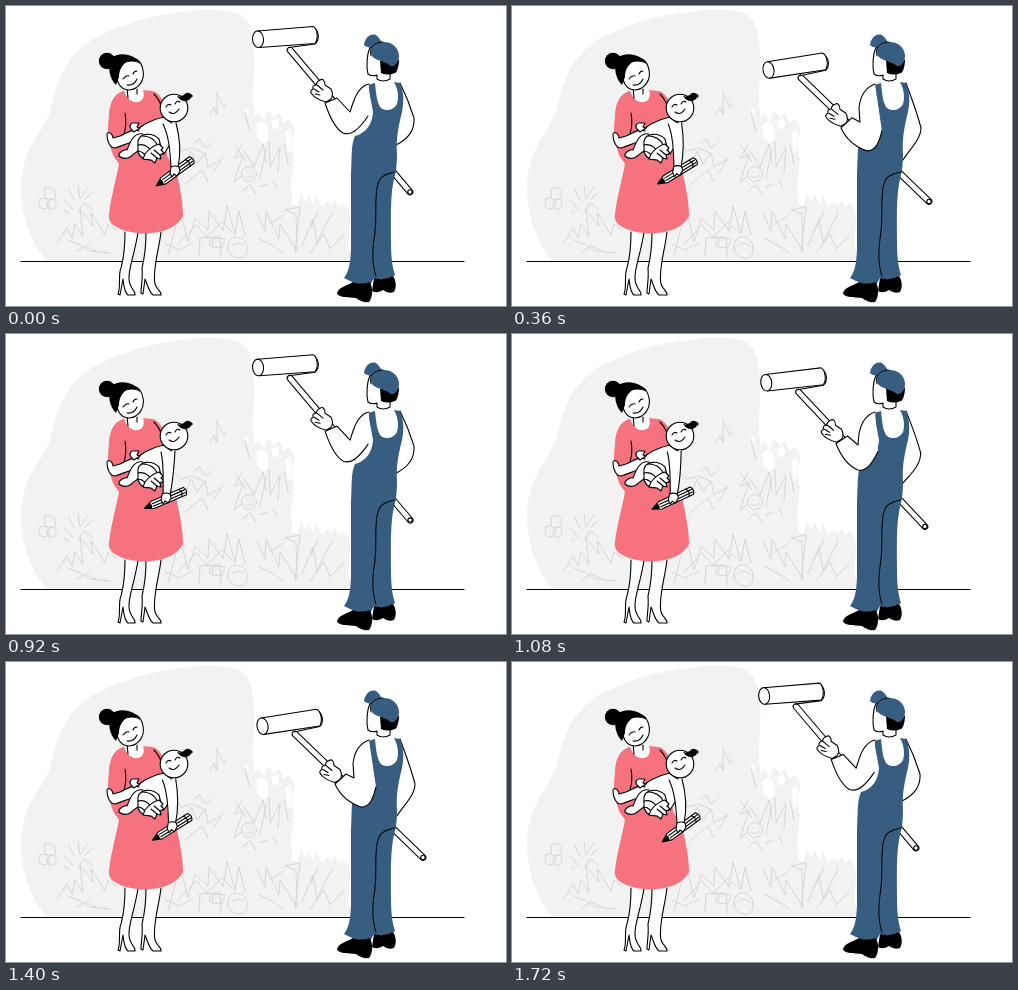
Write an HTML page that moves like this. It is 500 px wide and 300 px high and loops after 1.76 s.

```html
<!DOCTYPE html>
<html lang="en">
<head>
<meta charset="utf-8">
<title>Painting over the wall</title>
<style>
  html, body { margin: 0; height: 100%; overflow: hidden; background: #fff; }
  svg { display: block; width: 100%; height: 100%; }
  .line { fill: none; }
  .ink { fill: #000; stroke: none; }
  .pink { fill: #f7727f; stroke: none; }
  .blue { fill: #375d80; stroke: none; }
  .bare { fill: #fff; stroke: none; }
</style>
</head>
<body>
<svg viewBox="0 0 500 300" fill="#fff" stroke="#000" stroke-width="1.1" stroke-linecap="round" stroke-linejoin="round">
  <!-- wall -->
  <path fill="#f2f2f2" stroke="none" d="M246 30C245 18 239 9 228 6C214 3 195 3 178 6C145 9 115 18 87 33C66 46 54 66 48 90C44 108 41 115 33 127C19 147 14 166 15 188C17 214 25 236 40 254H346L342 236C343 225 346 212 342 203L337 197 333 202 330 194 326 199 321 196 316 201 311 190 307 198 303 189 299 197 295 188 291 200 286 198 285 178 288 155 285 136 289 122 283 113 277 117 273 106 268 112 262 104 258 115 253 107 249 111C246 99 247 82 248 68C249 50 248 40 246 30Z"/>
  <path class="bare" d="M251 118q5-5 10 0l2 15q-5 6-9 2q-5-4-3-17ZM280 126l5-3v22q-4 4-4-4ZM238 104l5-2-1 7ZM265 115l7-3 1 9-6 3Z"/>
  <g class="line" stroke="#d3d3d3" stroke-width=".9">
    <path d="M39 183q7-4 10 3t-5 8q-7 0-5-11ZM34 193q7-3 9 3t-5 7q-7-1-4-10ZM44 193q7-1 6 6t-8 3q-3-5 2-9"/>
    <path d="M62 182l6 12M59 195l8 9M72 180l2 13 8-12M72 206l6-9 9 7M79 193l7-6M58 204l5 3"/>
    <path d="M52 236l9-14 5 10 3-14 8 13-3-28 13 17-2-14 14 23 3-11 8 6M62 234l12 5 9 6 21 2M70 246l9-6 11 5"/>
    <path d="M204 109l4-8 3 7 0-21 7 14 2-3M188 137l6-4 5 9 7-5M166 136l9 9 11-3 14 6M178 163l7-18 6 13 8-11 3 14 14-8-9 14M178 179l18-15 6 12"/>
    <path d="M236 139l-8 13 9-3-9 27 8-6M238 145l10 16 9-23 3 19M229 139l11 17M260 143l-6 29M263 136l1 25 10-20-2 26M278 138l4 20M267 174l4 9M253 181l8-3M236 185l8-6 6 9M239 107l5 19"/>
    <circle cx="243" cy="168" r="7.5"/><path d="M240 166h1M245 166h1M239 170q4 4 8-1"/>
    <path d="M162 249l12-46 8 33 7-24 13 12 1-19 14 20 4-25 8 28 4-23 6 24M172 238l18-19 11 12 15-15 10 10M160 238l13 6 14-7M194 232l20-1 1 21M194 232l-1 18M204 232v8M219 233l-12-1-1 9 9 1Z"/>
    <path d="M222 244q-1-14 9-13t10 12-9 9-10-8ZM226 240q6-6 12 0M251 208l8 17 1-20 13 28 1-15 17 27-1-37-11-4 15-3-5 45M252 232l17 9 8 6M296 240l11-27 4 24 15-30M304 247l14-19 6 15 14-15M312 205l-7 16M263 218l14-9"/>
  </g>
  <path class="line" d="M15 255.5H458"/>

  <!-- woman -->
  <path d="M119 226C119 241 118 251 115 262C112 268 115 281 112 288L114 289 117 273C118 280 118 286 122 289H129C130 286 126 284 124 278C120 268 129 248 132 226"/>
  <path d="M140 226C140 242 139 250 136 262C137 273 135 280 135 287L137 288 139 273C142 280 143 286 147 289H155C156 286 151 284 149 278C146 265 153 244 155 226"/>
  <path class="pink" d="M117 85C108 88 103 97 103 111C101 124 102 134 106 146C108 153 112 155 113 158C111 170 105 190 103 208C102 212 104 216 107 219C118 226 130 228 145 227C160 226 172 220 177 210C177 194 173 178 170 163L161 150 158 104C157 94 154 87 147 85L136 84 119 84Z"/>
  <path class="bare" d="M118 84C120 92 125 97 132 96C137 95 139 90 137 84Z"/>
  <path d="M121 81L122 91Q127 94 132 90L131 80Z" stroke="none"/>
  <path class="line" d="M121 81L122 92M131 83V88"/>
  <circle cx="101" cy="55" r="8.2" class="ink"/>
  <path d="M110 61C109 75 114 84 123 84C133 83 139 74 137 64C136 58 134 55 130 53L115 53Z"/>
  <path class="ink" d="M105 52C114 45 129 48 135 58C130 55 125 55 121 56C115 59 113 66 113 71L110 79C104 73 101 62 105 52Z"/>
  <path class="line" d="M117 73q3-4 6-3M127 68q1-3 4-3M121 79q7 1 10-6"/>
  <path class="line" d="M119 107Q121 118 118 128M148 88Q155 95 157 106"/>

  <!-- baby -->
  <path d="M158 111C149 113 142 116 136 120C130 124 128 131 131 140L140 149 158 148 166 135 168 119Z"/>
  <path d="M133 125C126 122 120 128 114 130L107 132C106 126 101 125 101 129C101 135 104 142 109 142C116 140 121 137 127 136"/>
  <path d="M137 128C128 126 124 136 121 144C118 143 112 147 113 150C116 153 121 153 124 151C130 146 134 143 138 142"/>
  <path d="M132 135C134 127 146 126 153 133L156 145C150 156 136 157 132 146Z"/>
  <path class="line" d="M136 130C146 130 151 136 153 144M132 139C140 137 146 143 147 152M132 145Q139 146 141 153"/>
  <path d="M139 148C143 143 149 139 153 138L157 142 155 144 158 147 154 149 155 153 151 152 149 157 145 154 137 153Z"/>
  <path class="line" d="M148 144l6 5M145 147l6 5"/>
  <path d="M125 123C122 119 126 116 129 117L133 117 131 121 134 122 128 126Z"/>
  <g id="pencil">
    <path d="M-24 1L-15-3H20Q23 1 20 5H-15Z"/>
    <path class="line" d="M-15-.3H20M-15 2.500H20M15-3Q18 1 15 5"/>
    <path class="ink" d="M-24 1L-17-2Q-15 1-17 4Z"/>
  </g>
  <path id="babyArm"/>
  <path id="babyHand" d="M-4-4Q0-6 4-4L5 0 2 5-1 3-3 6-5 2Z"/>
  <circle cx="168" cy="102" r="13.8"/>
  <path class="ink" d="M171 90C174 91 177 90 180 87Q184 86 187 90C184 93 182 95 179 95Q174 95 171 90Z"/>
  <path class="line" d="M160 101q2-4 5-2M169 98q2-4 5-2M163 106q6 4 10-3"/>

  <!-- painter: pole and roller -->
  <path id="poleEdge" stroke-width="6.8"/>
  <path id="poleFill" stroke="#fff" stroke-width="4.7"/>
  <circle id="poleEnd" r="2.2"/>
  <g id="roller">
    <path d="M308 22C313 25 314 34 309 38L283 41.500"/>
    <path d="M251.500 25L307 20.500C311 22 313 32 309 37.500L253 41.500Z"/>
    <ellipse cx="252" cy="33.200" rx="5.500" ry="8.300" transform="rotate(-5 252 33)"/>
  </g>

  <!-- painter: body -->
  <path id="backArm"/>
  <path class="bare" d="M363 77L371 72 385 72 394 78 396 95 390 135 350 138 348 105Z"/>
  <path d="M364 41C361 48 360 60 362 68Q366 71 371 69V73Q377 77 384 73V60L380 45Z"/>
  <path class="ink" d="M374 54L393 54C393 60 391 66 389 67Q381 70 375 67Z"/>
  <path class="blue" d="M358 39C359 32 364 27 370 29C373 31 374 34 376 36C385 35 393 41 393 50C393 56 389 61 385 60C378 55 372 55 368 52C364 49 364 45 365 41Q361 42 358 39Z"/>
  <path class="line" d="M365 50C362 42 368 36 377 36" stroke-width=".9"/>
  <path class="blue" d="M362 79L369 77C370 87 371 98 375 102C380 106 388 104 391 98C393 91 392 83 388 76L394 77C398 86 398 96 396 106C392 122 390 134 391 148C391 158 390 166 388 173C384 190 385 215 385 235C385 250 386 260 389 269Q379 276 368 272L364 279Q350 279 338 272C343 266 345 255 345 240L345 167C346 149 345 139 349 130C360 127 366 119 367 106Z"/>
  <path class="line" d="M389 166Q378 168 374 173C367 186 372 210 368 233Q365 255 370 270" stroke-dasharray="2 1"/>
  <path class="ink" d="M347 276Q355 279 364 276C367 282 367 291 363 296Q356 297 350 292C342 291 335 292 331 288C331 282 340 280 347 276ZM368 272Q378 275 387 270C391 276 390 283 388 286Q382 288 377 284Q371 288 366 285Z"/>
  <path id="frontArm"/>
  <g id="hand">
    <path d="M314 74C317 72 319 75 319 79L325 83C327 87 327 90 325 93L320 96C313 94 308 91 306 88Q303 85 307 83Q306 79 310 79Q311 75 314 74Z"/>
    <path class="line" d="M308 83L313 86M311 79L317 84M309 88L314 89"/>
  </g>
</svg>
<script>
const LOOP = 1760, STROKE = LOOP / 2, STEP = 40;
const el = id => document.getElementById(id);
const set = (id, name, value) => el(id).setAttribute(name, value);
const lerp = (a, b, k) => a + (b - a) * k;

// Smooth 0..1 ramp between two times
const ease = (t, from, to) => {
  const p = Math.min(1, Math.max(0, (t - from) / (to - from)));
  return (1 - Math.cos(Math.PI * p)) / 2;
};

// Blend two paths that share the same commands
function blend(a, b, k) {
  const ends = b.match(/-?[\d.]+/g);
  let i = 0;
  return a.replace(/-?[\d.]+/g, v => lerp(+v, +ends[i++], k).toFixed(2));
}

const frontArm = [
  "M363 78C354 80 350 88 347 97L344 106 331 92 319 97C324 112 330 123 337 127C344 130 352 125 362 110",
  "M363 78C352 82 348 92 347 102L348 116 340 112 329 122C334 133 343 141 355 145C364 145 367 137 370 125"];
const backArm = [
  "M394 77C399 87 404 99 408 112C409 125 402 133 390 139",
  "M394 77C399 91 405 106 409 122C409 133 398 143 391 154"];
const babyArm = [
  "M157 118C163 130 164 145 165 161L172 161C175 147 174 132 170 117",
  "M155 118C158 130 157 145 157 160L164 160C167 147 168 132 169 117"];
const pole = ["M284 44L404 186", "M289 72L417 195.5"];

function draw(t) {
  const scribble = ease(t, 0, 860) - ease(t, 860, 1720);
  const handX = lerp(169, 160, scribble), handY = lerp(165, 164, scribble);
  set("pencil", "transform", `translate(${handX} ${handY}) rotate(${lerp(-36, -23, scribble)})`);
  set("babyArm", "d", blend(...babyArm, scribble));
  set("babyHand", "transform", `translate(${handX} ${handY})`);

  const c = t % STROKE;
  const upper = ease(c, 20, 380) - ease(c, 560, 870);
  const lower = ease(c, 20, 310) - ease(c, 545, 840);
  const top = blend(...pole, upper).split("L")[0];
  const endX = lerp(404, 417, lower), endY = lerp(186, 195.5, lower);
  for (const id of ["poleEdge", "poleFill"]) set(id, "d", `${top}L${endX} ${endY}`);
  set("poleEnd", "cx", endX);
  set("poleEnd", "cy", endY);
  set("roller", "transform", `translate(${4.5 * upper} ${31 * upper}) rotate(${-4.5 * upper} 252 33)`);
  set("hand", "transform", `translate(${9 * upper} ${24.5 * upper})`);
  set("frontArm", "d", blend(...frontArm, upper));
  set("backArm", "d", blend(...backArm, lower));
}

const start = performance.now();
function tick() {
  const t = (performance.now() - start) % LOOP;
  draw(Math.floor(t / STEP) * STEP);
  requestAnimationFrame(tick);
}
tick();
</script>
</body>
</html>
```
